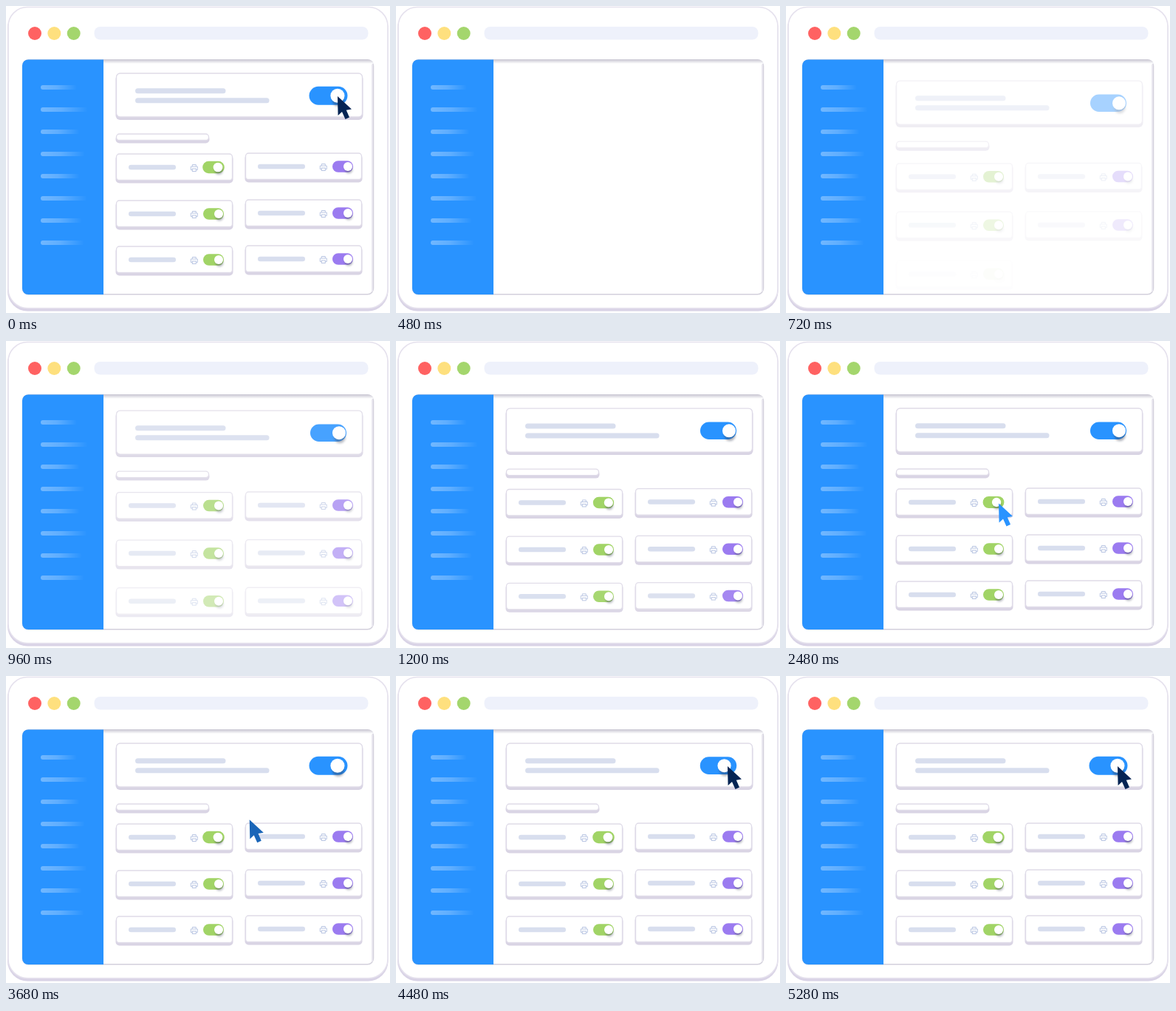
Recreate the animation shown at these times as an HTML page. Size 520 by 415 pixels, loop 5.76 s.

```html
<!DOCTYPE html>
<html lang="en">
<head>
<meta charset="utf-8">
<title>Toggle panel</title>
<style>
html, body { margin: 0; width: 100%; height: 100%; overflow: hidden; background: #fff; }
svg { display: block; }
</style>
</head>
<body>
<svg id="stage" width="520" height="415" viewBox="0 0 520 415">
  <defs>
    <linearGradient id="fade">
      <stop offset="0" stop-color="#fff" stop-opacity=".34"/>
      <stop offset=".45" stop-color="#fff" stop-opacity=".25"/>
      <stop offset="1" stop-color="#fff" stop-opacity="0"/>
    </linearGradient>
    <linearGradient id="lip" x2="0" y2="1">
      <stop offset="0" stop-color="#cac8d3"/>
      <stop offset="1" stop-color="#fff"/>
    </linearGradient>
    <filter id="soft" x="-60%" y="-60%" width="220%" height="220%"><feGaussianBlur stdDeviation="1.6"/></filter>
    <clipPath id="content"><rect x="132" y="73" width="365" height="316"/></clipPath>
  </defs>
  <rect x="2" y="3" width="515.5" height="409.5" rx="27" fill="#d9d3e6"/>
  <rect x="3" y="1.5" width="514" height="407" rx="26" fill="#fff" stroke="#e5e1ed" stroke-width="1.6"/>
  <circle cx="39" cy="37" r="9" fill="#ff6262"/>
  <circle cx="65.3" cy="37" r="9" fill="#fee07e"/>
  <circle cx="91.7" cy="37" r="9" fill="#a4d66d"/>
  <rect x="119.5" y="28" width="371" height="17.5" rx="8" fill="#eef1fb"/>
  <rect x="22.5" y="72.8" width="475" height="317" rx="8" fill="#fff" stroke="#d3d0dc" stroke-width="1.5"/>
  <path d="M130 72.5H490Q496 72.5 498 78H130Z" fill="url(#lip)"/>
  <path d="M496 79V386" stroke="#e9e7ef" stroke-width="2"/>
  <path d="M132 72.5V390H30a8 8 0 0 1-8-8V80.500a8 8 0 0 1 8-8Z" fill="#2993ff"/>
  <g id="menu"></g>
  <g id="items" clip-path="url(#content)"></g>
  <g clip-path="url(#content)">
    <path id="cursor" d="M0 0L.6 26L6 21L10.500 31L16 28.500L11.800 18.800L19 17.500Z"/>
  </g>
</svg>
<script>
const LOOP = 5760, STEP = 80;
const $ = id => document.getElementById(id);
const clamp = v => Math.max(0, Math.min(1, v));
const span = (t, a, b) => clamp((t - a) / (b - a));
const easeOut = p => 1 - (1 - p) ** 2;
const easeInOut = p => p < .5 ? 2 * p * p : 1 - 2 * (1 - p) ** 2;
const mix = (a, b, p) => a + (b - a) * p;

const pill = (x, y, w, h, fill) =>
  `<rect x="${x}" y="${y}" width="${w}" height="${h}" rx="${h / 2}" fill="${fill}"/>`;

const plate = (x, y, w, h, r) =>
  `<rect x="${x - 1}" y="${y + 1.5}" width="${w + 2}" height="${h + 2.5}" rx="${r + 1}" fill="#d9d4e4"/>
   <rect x="${x}" y="${y}" width="${w}" height="${h}" rx="${r}" fill="#fff" stroke="#dfdbe8" stroke-width="1.3"/>`;

const toggle = (id, x, y, w, h, reach, r, fill) =>
  `<g id="${id}" data-x="${x}" data-y="${y}" data-reach="${reach}">
    ${pill(x - w / 2, y - h / 2, w, h, fill)}
    <g class="knob">
      <circle cx="${x + reach + 1}" cy="${y + r * .7}" r="${r * .85}" fill="#333a50" opacity=".4" filter="url(#soft)"/>
      <circle cx="${x + reach}" cy="${y}" r="${r}" fill="#fff"/>
    </g>
  </g>`;

const printer = (x, y) =>
  `<g transform="translate(${x} ${y})" fill="none" stroke="#bac6e3" stroke-width="1">
    <path d="M-2.500 -2V-4.500H2.500V-2M-2.500 2.500H-4.500V-2H4.500V2.500H2.500"/>
    <rect x="-2.500" y="1" width="5" height="3.500"/>
  </g>`;

const BAR = '#d8deee';
const items = [];
function addItem(start, markup) {
  const node = document.createElementNS('http://www.w3.org/2000/svg', 'g');
  node.innerHTML = markup;
  $('items').append(node);
  items.push({ node, start });
}

$('menu').innerHTML = [49, 64, 53, 60, 53, 63, 56, 59]
  .map((w, i) => pill(47, 107 + i * 30, w, 6, 'url(#fade)')).join('');

addItem(502, plate(149.5, 91, 333, 59, 5)
  + pill(175, 111.3, 122.5, 7, BAR) + pill(175, 124.3, 181.5, 7, BAR)
  + toggle('main', 436.5, 121.2, 49, 23.5, 14.5, 9, '#2993ff'));
addItem(505, plate(149.5, 173, 125, 8.5, 4));

[0, 63, 125].forEach((dy, row) => [0, 1].forEach(col => {
  const x = 149.5 + col * 175, y = 200 + dy - col;
  addItem([570, 625, 705][row] + col * 15, plate(x, y, 157, 35.5, 4)
    + pill(x + 16.5, y + 14.7, 64, 6.5, BAR)
    + printer(x + 105.3, y + 19)
    + toggle(`t${row}${col}`, x + 131.5, y + 18, 28, 15.5, 7, 6, col ? '#9b7bf0' : '#a1d466'));
}));

// Hover enlarges the switch; a press shrinks it and pulls the knob back.
function setToggle(id, hover, press, pull) {
  const node = $(id), { x, y, reach } = node.dataset;
  const s = 1 + .06 * hover - .07 * press;
  node.setAttribute('transform', `translate(${x} ${y}) scale(${s}) translate(${-x} ${-y})`);
  node.querySelector('.knob').setAttribute('transform',
    `translate(${-.19 * reach * hover - pull * press} 0)`);
}

const pressed = (t, down, held, up, done) =>
  easeOut(span(t, down, held)) * (1 - easeOut(span(t, up, done)));

function draw(t) {
  const intro = t < 480;
  for (const { node, start } of items) {
    const p = intro ? 1 : span(t, start, start + 750);
    node.setAttribute('transform', `translate(0 ${20 * (1 - p) ** 2})`);
    node.setAttribute('opacity', clamp(p * 1.4));
  }

  setToggle('t00', intro ? 1 : span(t, 1120, 1600), pressed(t, 2400, 2720, 3040, 3520), 4);
  setToggle('main', intro ? 1 : span(t, 3040, 3680), pressed(t, 4320, 4640, 4800, 5280), 5);

  const enter = easeInOut(span(t, 1440, 1920));
  const cross = intro ? 1 : easeInOut(span(t, 3320, 4320));
  const x = mix(mix(115, 288, enter), 449, cross);
  const y = mix(mix(233, 219.5, enter), 122, cross);
  const tint = clamp(cross * 1.6);
  const rgb = [[41, 5], [147, 36], [255, 84]].map(([a, b]) => Math.round(mix(a, b, tint)));
  const cursor = $('cursor');
  cursor.setAttribute('transform', `translate(${x} ${y})`);
  cursor.setAttribute('fill', `rgb(${rgb})`);
  cursor.setAttribute('visibility', intro || t >= 1440 ? 'visible' : 'hidden');
}

const origin = performance.now();
function tick() {
  const t = (performance.now() - origin) % LOOP;
  draw(Math.floor(t / STEP) * STEP);
  requestAnimationFrame(tick);
}
tick();
</script>
</body>
</html>
```
